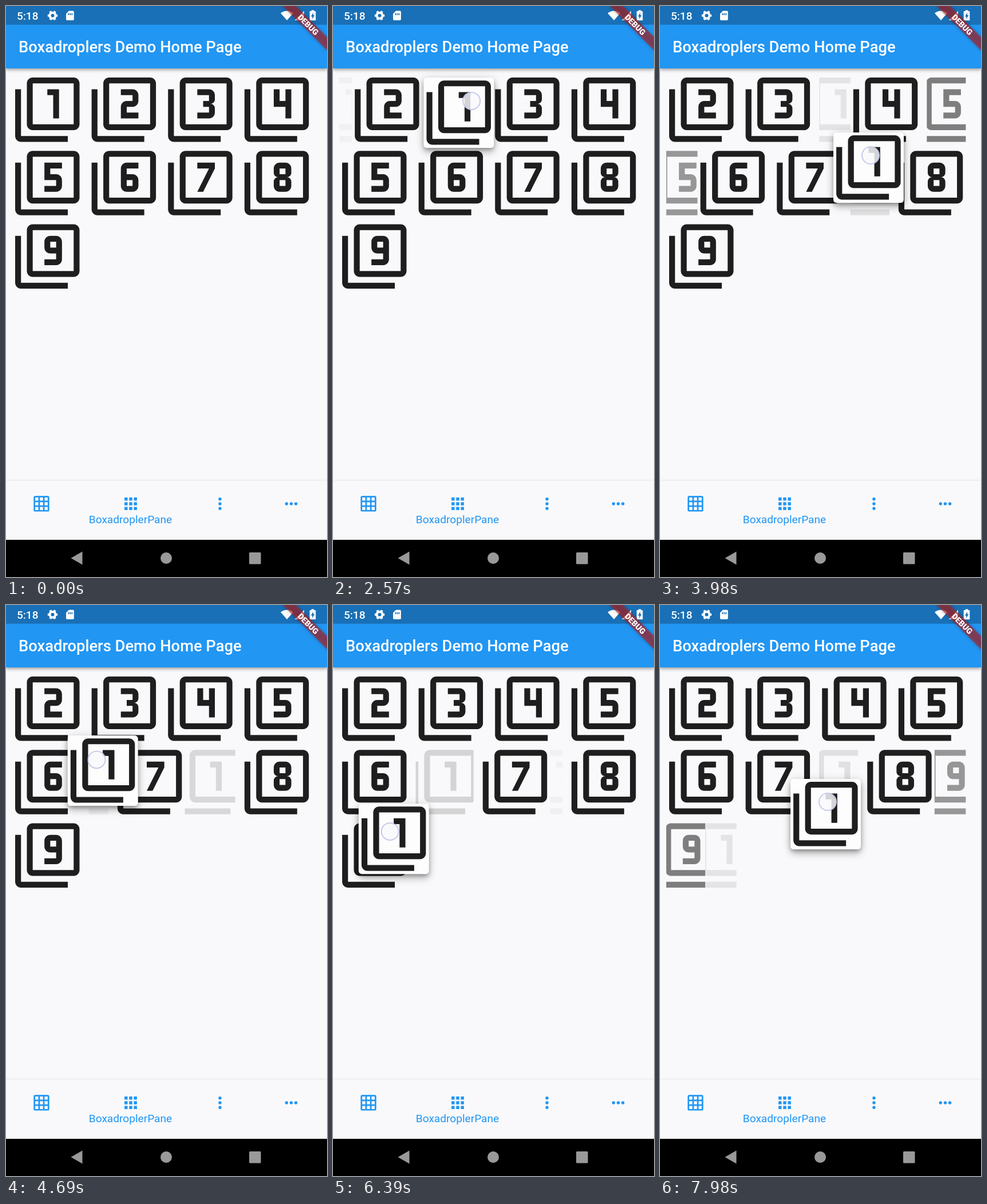
An HTML page for the animation above (8 s loop, 561 by 998 pixels).

```html
<!DOCTYPE html>
<html lang="en">
<head>
<meta charset="utf-8">
<title>Drag to reorder</title>
<style>
  html, body { margin: 0; width: 561px; height: 998px; overflow: hidden; }
  body { position: relative; background: #f9f9fb; font-family: Roboto, sans-serif; }
  .abs, body > * { position: absolute; }
  #appbar { left: 0; top: 0; width: 561px; height: 109px; background: #2196f3;
    box-shadow: 0 2px 5px rgba(0,0,0,.28), 0 4px 6px rgba(0,0,0,.12); }
  #tabs { left: 0; top: 830px; width: 561px; height: 103px; background: #f9f9fb;
    box-shadow: 0 -1px 4px rgba(0,0,0,.08); }
  #grid, #chrome { left: 0; top: 0; }
  #grid { fill: #1e1e1e; }
  #card { left: 0; top: 0; width: 122.7px; height: 122.7px; border-radius: 5.5px; background: #fdfdfd;
    box-shadow: 0 4px 7px -1px rgba(0,0,0,.28), 0 8px 14px rgba(0,0,0,.2), 0 1px 16px rgba(0,0,0,.12); }
  #card svg { display: block; fill: #1e1e1e; }
  #touch { left: -16px; top: -16px; width: 28px; height: 28px; border: 2px solid rgba(190,195,232,.85);
    border-radius: 50%; background: rgba(249,249,253,.84); }
</style>
</head>
<body>
<div id="appbar"></div>
<div id="tabs"></div>
<svg id="grid" width="561" height="998"></svg>
<svg id="chrome" width="561" height="998">
  <rect width="561" height="32.7" fill="#1970b6"/>
  <text x="22" y="80.5" font-size="27.3" font-weight="500" fill="#fff">Boxadroplers Demo Home Page</text>

  <g fill="#fff">
    <text x="19" y="24" font-size="19" font-weight="500">5:18</text>
    <g fill="none" stroke="#fff" transform="translate(81.5 16.7)">
      <circle r="5" stroke-width="4"/>
      <circle r="7.4" stroke-width="2.6" pathLength="12" stroke-dasharray="1" stroke-dashoffset=".5"/>
    </g>
    <path fill-rule="evenodd" d="M110 8.5h7q1.800 0 1.800 1.800v13q0 1.800-1.800 1.800h-10.200q-1.800 0-1.800-1.800v-9.800zM108.500 12.500v3.500h1.700v-3.500zm3 0v3.500h1.700v-3.500zm3 0v3.500h1.700v-3.500z"/>
    <path d="M480 12.500Q491 4.500 502 12.500L491 25z"/>
    <path d="M504.500 25L521 8.500V25z"/>
    <path fill-rule="evenodd" d="M533.700 9v-1.700h4.600V9h2.200q.8 0 .8.8v14.700q0 .8-.8.8h-9q-.8 0-.8-.8V9.800q0-.8.8-.8zM537 11.500l-4 7h2.300v4.500l4-7H537z"/>
  </g>

  <g transform="translate(561 0) rotate(45)">
    <rect x="-56" y="38.2" width="112" height="16.4" fill="#b71c1c" fill-opacity=".63"
      style="filter:drop-shadow(0 0 3px rgba(0,0,0,.4))"/>
    <text y="51.300" font-size="13.900" font-weight="900" text-anchor="middle" fill="#fff">DEBUG</text>
  </g>

  <g id="tabIcons" fill="#2196f3">
    <text x="217.5" y="904" font-size="19.1" text-anchor="middle">BoxadroplerPane</text>
  </g>

  <rect y="933" width="561" height="65" fill="#000"/>
  <g fill="#999">
    <path d="M113.500 965L133.500 953.500V976.500z"/>
    <circle cx="280" cy="965" r="10"/>
    <rect x="425" y="955" width="20.500" height="20.500" rx="1.500"/>
  </g>
</svg>
<div id="card"></div>
<div id="touch"></div>

<script>
const LOOP = 8000, TOUCH = 1200, LIFT = 1700, SHIFT = 200, LEAD = 50;
const SIZE = 122.7, GAP = 10.9, ROW = 128.2, LEFT = 10.9, TOP = 119.9;
const DRAGGED = 1;

const FRAME = 'M3 5H1v16c0 1.100.9 2 2 2h16v-2H3z' +
  'M21 1H7c-1.100 0-2 .9-2 2v14c0 1.100.9 2 2 2h14c1.100 0 2-.9 2-2V3c0-1.100-.9-2-2-2zm0 16H7V3h14z';
const DIGITS = [
  'M14 15h2V5h-4v2h2z',
  'M17 13h-4v-2h2c1.100 0 2-.89 2-2V7c0-1.110-.9-2-2-2h-4v2h4v2h-2c-1.100 0-2 .89-2 2v4h6z',
  'M17 13v-1.500c0-.83-.67-1.500-1.500-1.500.83 0 1.500-.67 1.500-1.500V7c0-1.110-.9-2-2-2h-4v2h4v2h-2v2h2v2h-4v2h4c1.100 0 2-.89 2-2z',
  'M15 15h2V5h-2v4h-2V5h-2v6h4z',
  'M17 13v-2c0-1.110-.9-2-2-2h-2V7h4V5h-6v6h4v2h-4v2h4c1.100 0 2-.89 2-2z',
  'M13 15h2c1.100 0 2-.89 2-2v-2c0-1.110-.9-2-2-2h-2V7h4V5h-4c-1.100 0-2 .89-2 2v6c0 1.110.9 2 2 2zm0-4h2v2h-2z',
  'M13 15l4-8V5h-6v2h4l-4 8z',
  'M13 15h2c1.100 0 2-.89 2-2v-1.500c0-.83-.67-1.500-1.500-1.500.83 0 1.500-.67 1.500-1.500V7c0-1.110-.9-2-2-2h-2c-1.100 0-2 .89-2 2v1.500c0 .83.67 1.500 1.500 1.500-.83 0-1.500.67-1.500 1.500V13c0 1.110.9 2 2 2zm0-8h2v2h-2zm0 4h2v2h-2z',
  'M15 5h-2c-1.100 0-2 .89-2 2v2c0 1.110.9 2 2 2h2v2h-4v2h4c1.100 0 2-.89 2-2V7c0-1.110-.9-2-2-2zm0 4h-2V7h2z'
];

// Slot changes of the dragged tile: start time, from, to
const MOVES = [
  [2407, 0, 1], [2960, 1, 2], [3870, 2, 6], [4635, 6, 5],
  [5640, 5, 6], [6226, 6, 5], [6450, 5, 8], [7870, 8, 6]
];

// Card path: time, x, y
const PATH = [
  [2080, 10.9, 119.9], [2330, 68, 122], [2570, 158, 125], [2800, 238, 130],
  [3100, 290, 138], [3330, 310, 142], [3530, 310, 142], [3800, 307, 190],
  [3920, 303, 221], [4400, 303, 221], [4550, 205, 225], [4690, 108, 228],
  [4880, 72, 239], [4980, 72, 242], [5230, 72, 242], [5420, 136, 245],
  [5600, 269, 250], [5720, 345, 260], [5850, 384, 264], [6020, 370, 264],
  [6200, 190, 310], [6300, 90, 335], [6390, 45, 347], [6500, 28, 365],
  [6750, 19, 383], [7020, 19, 383], [7270, 63, 389], [7650, 63, 389],
  [7780, 145, 346], [7900, 217, 310], [7980, 228, 304]
];

const byId = id => document.getElementById(id);
const card = byId('card'), touch = byId('touch');

function add(parent, tag, attrs) {
  const el = document.createElementNS('http://www.w3.org/2000/svg', tag);
  for (const k in attrs) el.setAttribute(k, attrs[k]);
  return parent.appendChild(el);
}

function addTile(parent, n) {
  const box = add(parent, 'svg', { width: SIZE, height: SIZE, viewBox: '0 0 24 24' });
  add(box, 'path', { d: FRAME + DIGITS[n - 1], 'fill-rule': 'evenodd' });
  return box;
}

function drawTabs() {
  let cells = '';
  for (let i = 0; i < 9; i++) cells += `M${4 + i % 3 * 6} ${4 + (i / 3 | 0) * 6}h4v4h-4z`;
  const icon = cx => add(byId('tabIcons'), 'g', { transform: `translate(${cx - 16.4} 853.6) scale(1.364)` });
  add(icon(62), 'path', {
    'fill-rule': 'evenodd',
    d: 'M4 2h16q2 0 2 2v16q0 2-2 2H4q-2 0-2-2V4q0-2 2-2z' + cells
  });
  add(icon(218), 'path', { d: cells });
  const tall = icon(374), wide = icon(498.500);
  for (const c of [6, 12, 18]) {
    add(tall, 'circle', { cx: 12, cy: c, r: 2 });
    add(wide, 'circle', { cx: c, cy: 12, r: 2 });
  }
}

const slope = (i, k) => {
  const a = PATH[i], b = PATH[i + 1];
  return a && b ? (b[k] - a[k]) / (b[0] - a[0]) : 0;
};
// Harmonic mean keeps the curve from overshooting at rests
function tangent(i, k) {
  const a = slope(i - 1, k), b = slope(i, k);
  return a * b > 0 ? 2 * a * b / (a + b) : 0;
}
function along(t, k) {
  const last = PATH.length - 1;
  if (t <= PATH[0][0]) return PATH[0][k];
  if (t >= PATH[last][0]) return PATH[last][k];
  const i = PATH.findIndex(p => p[0] > t) - 1;
  const a = PATH[i], b = PATH[i + 1], d = b[0] - a[0], u = (t - a[0]) / d, v = 1 - u;
  return v * v * ((1 + 2 * u) * a[k] + u * d * tangent(i, k)) +
    u * u * ((3 - 2 * u) * b[k] - v * d * tangent(i + 1, k));
}

const slotX = s => LEFT + s % 4 * (SIZE + GAP);
const rowOf = s => s / 4 | 0;

// Shows the middle part of a tile, as wide as its share
function place(el, x, row, share, alpha) {
  el.style.display = share > 0.005 ? '' : 'none';
  if (share <= 0.005) return;
  el.setAttribute('x', x);
  el.setAttribute('y', TOP + row * ROW);
  el.setAttribute('width', SIZE * share);
  el.setAttribute('viewBox', `${12 - 12 * share} 0 ${24 * share} 24`);
  el.setAttribute('opacity', alpha);
}
function placePart(el, slot, share, atRight, alpha) {
  place(el, slotX(slot) + (atRight ? SIZE * (1 - share) : 0), rowOf(slot), share, alpha * share);
}

function reorder(list, from, to) {
  const out = list.slice();
  out.splice(to, 0, out.splice(from, 1)[0]);
  return out;
}

const tiles = DIGITS.map((_, i) => [addTile(byId('grid'), i + 1), addTile(byId('grid'), i + 1)]);
addTile(card, DRAGGED);
drawTabs();

function render(t) {
  let before = DIGITS.map((_, i) => i + 1), after = before, p = 1, forward = true;
  for (const [start, from, to] of MOVES) {
    if (t < start) break;
    before = after;
    after = reorder(before, from, to);
    forward = to > from;
    p = Math.min(1, (t - start) / SHIFT);
  }

  tiles.forEach(([main, extra], i) => {
    const id = i + 1, s0 = before.indexOf(id), s1 = after.indexOf(id);
    const ghost = id === DRAGGED, alpha = ghost && t >= LIFT ? 0.2 : 1;
    extra.style.display = 'none';
    if (p === 1 || s0 === s1) {
      place(main, slotX(s1), rowOf(s1), 1, alpha);
    } else if (!ghost && rowOf(s0) === rowOf(s1)) {
      place(main, slotX(s1) + (forward ? 1 : -1) * (1 - p) * SIZE, rowOf(s1), 1, 1);
    } else {
      placePart(main, s0, 1 - p, !forward, alpha);
      placePart(extra, s1, p, forward, alpha);
    }
  });

  card.style.display = t >= LIFT ? '' : 'none';
  card.style.transform = `translate(${along(t, 1)}px, ${along(t, 2)}px)`;
  touch.style.display = t >= TOUCH ? '' : 'none';
  touch.style.transform = `translate(${along(t + LEAD, 1) + 65}px, ${along(t + LEAD, 2) + 40}px)`;
}

function tick() {
  render(performance.now() % LOOP);
  requestAnimationFrame(tick);
}
tick();
</script>
</body>
</html>
```
